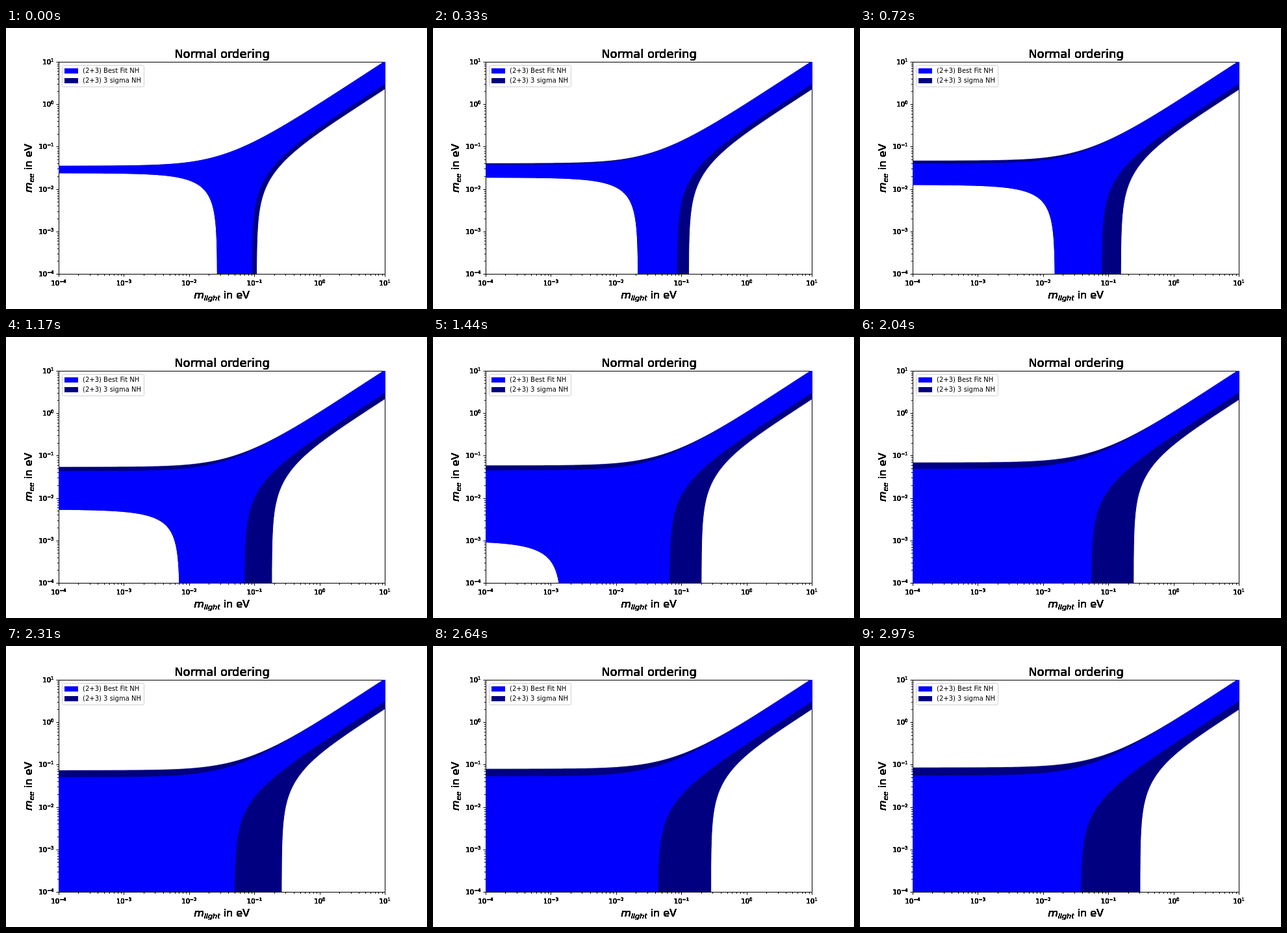
Recreate the animation shown at these times as an HTML page with a canvas. Size 648 by 432 pixels, loop 3 s.

```html
<!DOCTYPE html>
<html lang="en">
<head>
<meta charset="utf-8">
<title>Normal ordering</title>
<style>
html, body { margin: 0; width: 100%; height: 100%; overflow: hidden; background: #fff; }
canvas { display: block; }
</style>
</head>
<body>
<canvas id="plot" width="648" height="432"></canvas>
<script>
const ctx = document.getElementById('plot').getContext('2d');
const LEFT = 81, RIGHT = 583.2, TOP = 51.84, BOTTOM = 378;
const DECADE_X = (RIGHT - LEFT) / 5, DECADE_Y = (BOTTOM - TOP) / 5;
const NAVY = '#000080', BLUE = '#0000ff';

const xOf = log => LEFT + (log + 4) * DECADE_X;
const yOf = log => BOTTOM - (log + 4) * DECADE_Y;
const massAt = x => 10 ** (-4 + (x - LEFT) / DECADE_X);

// Active-neutrino sum: first state plus or minus the other two
const BEST = [0.675, 0.303, 0.022], SIGMA = [0.635, 0.341, 0.024];
const others = (m, c2, c3) => c2 * Math.hypot(m, 0.0087) + c3 * Math.hypot(m, 0.05);
const activeMax = (m, [c1, c2, c3]) => 0.99 * (c1 * m + others(m, c2, c3));
const activeMin = (m, [c1, c2, c3]) => 0.95 * (c1 * m - others(m, c2, c3));

// Sterile terms grow with the light mass too
const light = m => Math.sqrt(1 + m * m);
const heavy = m => Math.sqrt(1 + m * m / 2.8);

function band(color, upper, lower) {
  const edge = (x, f) => ctx.lineTo(x, yOf(Math.log10(Math.max(f(massAt(x)), 1e-6))));
  ctx.fillStyle = ctx.strokeStyle = color;
  ctx.lineWidth = 1;
  ctx.beginPath();
  for (let x = LEFT; x <= RIGHT + 2; x += 0.25) edge(x, upper);
  for (let x = RIGHT + 2; x >= LEFT; x -= 0.25) edge(x, lower);
  ctx.closePath();
  ctx.fill();
  ctx.stroke();
}

function drawBands(n) {
  const mix = 0.0021 + 0.00046 * n + 4e-7 * n * n;
  const leftFloor = m => 0.0302 * light(m) - mix * heavy(m) - activeMax(m, SIGMA);
  ctx.save();
  ctx.beginPath();
  ctx.rect(81, 52, 503, 326);
  ctx.clip();
  band(NAVY,
    m => activeMax(m, SIGMA) + 0.0285 * light(m) + mix * heavy(m),
    m => Math.max(leftFloor(m),
      activeMin(m, SIGMA) - 0.027 * light(m) - 0.000493 * n * heavy(m)));
  band(BLUE,
    m => activeMax(m, BEST) + 0.0308 * light(m) + 0.0002 * n * heavy(m),
    m => Math.max(leftFloor(m),
      activeMin(m, BEST) - 0.0298 * light(m) + 0.000184 * n * heavy(m)));
  ctx.restore();
}

// Parts are [text, size, rise, italic]; repeats harden the glyph edges
function label(parts, x, y, align = 0.5, repeats = 12) {
  const font = ([, size, , italic]) =>
    ctx.font = `${italic ? 'italic ' : ''}${size}px "DejaVu Sans", sans-serif`;
  const widths = parts.map(p => (font(p), ctx.measureText(p[0]).width));
  x -= align * widths.reduce((a, b) => a + b);
  ctx.fillStyle = '#000';
  parts.forEach((p, i) => {
    font(p);
    for (let k = 0; k < repeats; k++) ctx.fillText(p[0], x, y - p[2]);
    x += widths[i];
  });
}

const power = e => [['10', 10, 0], [String(e).replace('-', '\u2212'), 7, 3.8]];
const axisName = sub => [['m', 16, 0, true], [sub, 11.2, -2.6, true], [' in eV', 16, 0]];

function drawTicks(log, length) {
  const x = Math.round(xOf(log)), y = Math.round(yOf(log));
  ctx.fillRect(x, 379, 1, length);
  ctx.fillRect(81 - length, y, length, 1);
}

function drawAxes() {
  ctx.strokeStyle = '#000';
  ctx.lineWidth = 1;
  ctx.strokeRect(81.5, 52.5, 502, 326);
  for (let e = -4; e <= 1; e++) {
    ctx.fillStyle = '#000';
    drawTicks(e, 3.5);
    if (e < 1) for (let k = 2; k < 10; k++) drawTicks(e + Math.log10(k), 2);
    label(power(e), xOf(e), 395.5);
    label(power(e), 73.5, Math.round(yOf(e)) + 4, 1);
  }
  label([['Normal ordering', 18, 0]], 332.5, 46);
  label(axisName('light'), 332.1, 416);
  ctx.save();
  ctx.translate(40, 215.5);
  ctx.rotate(-Math.PI / 2);
  label(axisName('ee'), 0, 0);
  ctx.restore();
}

function drawLegend() {
  ctx.beginPath();
  ctx.roundRect(86.5, 57.5, 126, 33, 2);
  ctx.fillStyle = 'rgba(255,255,255,.8)';
  ctx.fill();
  ctx.strokeStyle = '#d0d0d0';
  ctx.stroke();
  [['(2+3) Best Fit NH', BLUE], ['(2+3) 3 sigma NH', NAVY]].forEach(([text, color], i) => {
    ctx.fillStyle = color;
    ctx.fillRect(90, 62 + 15 * i, 21, 8);
    label([[text, 10, 0]], 118, 69 + 15 * i, 0, 1);
  });
}

function draw() {
  ctx.fillStyle = '#fff';
  ctx.fillRect(0, 0, 648, 432);
  drawAxes();
  drawBands(Math.floor(performance.now() / 30) % 100);
  drawLegend();
  requestAnimationFrame(draw);
}
draw();
</script>
</body>
</html>
```
